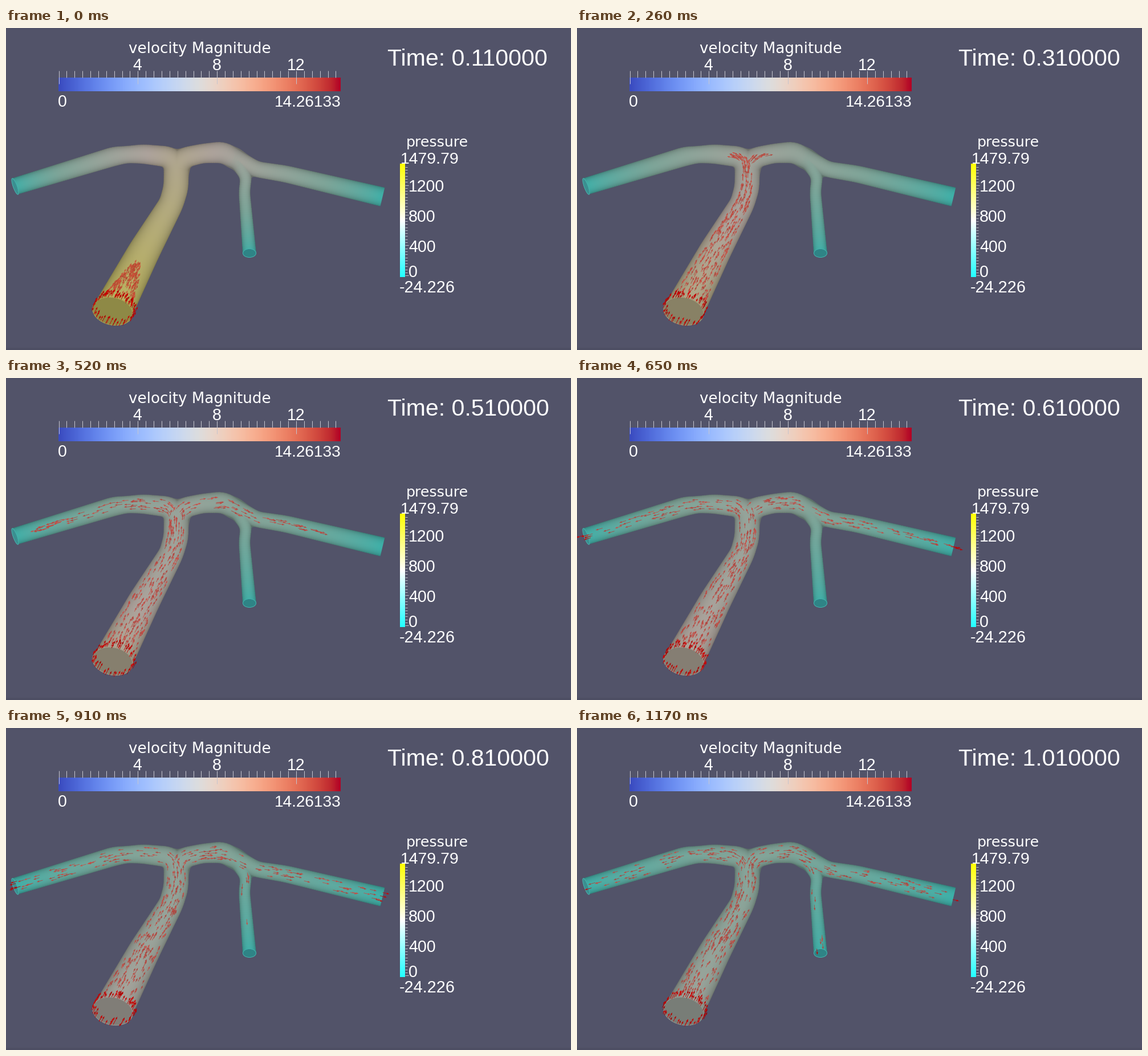
A matplotlib script that plays this animation: 991 by 565 pixels, repeating every 1.3 s.

```python
import numpy as np
import matplotlib.pyplot as plt
from matplotlib.animation import FuncAnimation
from matplotlib.collections import LineCollection, PolyCollection
from matplotlib.colors import LinearSegmentedColormap
from matplotlib.patches import Ellipse, Rectangle

W, H, DPI = 991, 565, 100
PX = 72 / DPI
FRAMES, STEP_MS = 10, 130
FRONT_SPEED = 117       # pixels per step on the tube axis
BG = "#525369"
RED = np.array([.84, 0, 0])

fig = plt.figure(figsize=(W / DPI, H / DPI), dpi=DPI, facecolor=BG)
ax = fig.add_axes([0, 0, 1, 1])


def label(x, y, text, size=28.5, font="Liberation Sans", ha="left"):
    return ax.text(x, y, text, fontsize=size * PX, family=font, color="white",
                   ha=ha, va="baseline", zorder=6)


def ticks(segments):
    ax.add_collection(LineCollection(segments, colors="#c4c4ce",
                                     linewidths=PX, zorder=5))


def pixel(v):
    return int(v) + .5


# ---- Legends ----
def velocity_legend():
    left, right, vmax = 92, 587, 14.26133
    ax.imshow(np.linspace(0, 1, 256)[None, :], cmap="coolwarm", aspect="auto",
              extent=(left, right, 111, 87), zorder=2)
    at = lambda v: pixel(left + (right - left) * v / vmax)
    ticks([[(at(.4 * i), 75), (at(.4 * i), 87 if i % 10 else 98)]
           for i in range(36)])
    for v in (4, 8, 12):
        label(at(v), 73.5, str(v), ha="center")
    label(340, 44.5, "velocity Magnitude", 26.1, "DejaVu Sans", "center")
    label(91, 138, "0")
    label(588, 138, "14.26133", 28, ha="right")


def pressure_legend():
    top, bottom, lo, hi = 238, 437, -24.226, 1479.79
    cmap = LinearSegmentedColormap.from_list(
        "pressure", ["#22ffff", "#ffffff", "#ffff00"])
    ax.imshow(np.linspace(1, 0, 199)[:, None], cmap=cmap, aspect="auto",
              extent=(691, 700, bottom, top), zorder=2)
    at = lambda v: bottom - (bottom - top) * (v - lo) / (hi - lo)
    ticks([[(700, pixel(at(v))), (706 if v % 400 == 0 else 704, pixel(at(v)))]
           for v in range(0, 1480, 40)])
    for v in range(0, 1201, 400):
        label(706, min(at(v) + 12, bottom), str(v))
    label(702, 208, "pressure", 25.3, "DejaVu Sans")
    label(692, 238, f"{hi}", 28.4)
    label(690, 464, f"{lo}", 28.8)


# ---- Vessel: key points x, y, radius ----
MAIN = [(187, 497, 34.5), (242, 392, 28), (290, 308, 21.5), (298, 280, 22),
        (299, 240, 21.5)]
LEFT = [(285, 226, 18.5), (240, 221, 17), (212, 222, 15), (190, 225, 17),
        (15, 278, 15)]
ARCH = [(314, 227, 18), (345, 220, 17), (380, 218, 19), (409, 233, 16)]
RIGHT = [(440, 248, 14), (490, 256, 15), (661, 296.5, 17)]
DOWN = [(421, 262, 10), (418, 288, 10), (427, 395, 12)]


def smooth_path(nodes, window=21):
    """Resample to one point per pixel and round the corners."""
    n = np.array(nodes, float)
    dist = np.r_[0, np.cumsum(np.hypot(*np.diff(n[:, :2], axis=0).T))]
    s = np.arange(0, dist[-1])
    pts = np.stack([np.interp(s, dist, c) for c in n.T], axis=1)
    padded = np.pad(pts, ((window // 2,) * 2, (0, 0)), mode="reflect",
                    reflect_type="odd")
    kernel = np.ones(window) / window
    return np.stack([np.convolve(c, kernel, "valid") for c in padded.T], axis=1)


PATHS = [smooth_path(MAIN + LEFT), smooth_path(MAIN + ARCH + RIGHT),
         smooth_path(MAIN + ARCH + DOWN)]
FORK = len(smooth_path(MAIN))


def pressure_share(path):
    """Linear drop up to the fork, then a power law down to the outlet."""
    i = np.arange(len(path))
    u = np.clip((i - FORK) / (len(path) - 1 - FORK), 0, 1)
    return np.where(i < FORK, 1 - .28 * i / FORK, .72 * (1 - u) ** .6)


def unit(v):
    return v / np.hypot(*v.T)[..., None]


BOX = (0, 670, 190, 540)


def surface_fields(blend=3):
    """Pressure share, shading and coverage of the pixels in BOX."""
    x0, x1, y0, y1 = BOX
    gx, gy = np.meshgrid(np.arange(x0, x1, dtype=np.float32) + .5,
                         np.arange(y0, y1, dtype=np.float32) + .5)
    near = np.full(gx.shape, 9, np.float32)
    total, share, union = (np.zeros_like(gx) for _ in range(3))

    def beyond(p, q):
        d = unit(p - q)
        return (gx - p[0]) * d[0] + (gy - p[1]) * d[1]

    for path, start in zip(PATHS, (0, FORK, FORK + 110)):
        edge = np.full(gx.shape, 999, np.float32)
        samples = np.c_[path, pressure_share(path)][start::4]
        for x, y, r, p in samples.astype(np.float32):
            d2 = (gx - x) ** 2 + (gy - y) ** 2
            q = d2 / r ** 2 + np.float32(.02)
            w = 1 / (q * q * q)
            total += w
            share += w * p
            np.minimum(near, q, out=near)
            np.minimum(edge, np.sqrt(d2) - r, out=edge)
        edge = np.maximum(edge, beyond(path[-1, :2], path[-9, :2]))
        if start == 0:
            edge = np.maximum(edge, beyond(path[0, :2], path[8, :2]))
        union += np.exp(-np.clip(edge, -60, 60) / blend)
    cover = np.clip(.5 + blend * np.log(union), 0, 1)
    shade = .7 + .32 * np.sqrt(1 - np.clip(near, 0, 1))
    return share / total, shade[..., None], cover[..., None]


SHARE, SHADE, COVER = surface_fields()
TONES = np.array([(56, 174, 167), (124, 162, 150), (170, 160, 153),
                  (188, 182, 62)]) / 255


def tone(p):
    return np.stack([np.interp(p, (0, 400, 770, 1400), c) for c in TONES.T],
                    axis=-1)


def inlet_pressure(k):
    """Steady decline after a short opening peak."""
    return 1020 - 42 * k + 190 * np.exp(-3 * k)


# ---- Inlet rim ----
RIM, RIM_AXES, TILT = np.array([187, 497]), np.array([36, 24.5]), 12
c, s = np.cos(np.radians(TILT)), np.sin(np.radians(TILT))
TURN = np.array([[c, s], [-s, c]])


def rim_level(pos):
    """1 on the rim, smaller inside."""
    return np.hypot(*((pos - RIM) @ TURN.T / RIM_AXES).T)


# ---- Particles carried by a parabolic velocity profile ----
def make_particles():
    rng = np.random.default_rng(7)
    born = np.repeat(np.arange(FRAMES), [260] + [32] * (FRAMES - 1)) - .8
    n = len(born)
    born = born + rng.uniform(0, .18, n) + (born > 0) * rng.uniform(0, .6, n)
    rho = np.sqrt(rng.uniform(0, .97, n))
    theta = rng.uniform(0, 2 * np.pi, n)
    speed = 1 - rho ** 2
    route = (rng.random(n) < .52).astype(int)
    route[(speed < .55) & (rng.random(n) < .2)] = 2
    return (born, rho * np.cos(theta), rho * np.sin(theta), speed, route,
            rng.uniform(.85, 1, n))


BORN, SIDE, DEPTH, SPEED, ROUTE, GLOW = make_particles()


def along(path, s, side):
    i = np.clip(s, 0, len(path) - 2).astype(int)
    t = unit(path[np.minimum(i + 4, len(path) - 1), :2]
             - path[np.maximum(i - 4, 0), :2])
    normal = np.stack([-t[:, 1], t[:, 0]], axis=1)
    pos = (path[i, :2] + (s - i)[:, None] * t
           + (.86 * side * path[i, 2])[:, None] * normal)
    return pos, t


def flow_arrows(k):
    """Base, tip and colour of the arrows inside the vessel."""
    haze = tone(inlet_pressure(k) * .9)
    inner = .68 * np.array([.86, .16, .13]) + .32 * haze
    for r, path in enumerate(PATHS):
        s = FRONT_SPEED * (k - BORN) * SPEED + 22 * DEPTH
        m = (ROUTE == r) & (k > BORN) & (s < len(path) + 4)
        pos, t = along(path, s[m], SIDE[m])
        level = rim_level(pos)
        bare = ((level < 1.3) | (s[m] > len(path) - 12))[:, None]
        length = 7 + 7 * SPEED[m] * min(1, .4 + k)
        color = np.where(bare, RED, inner) * GLOW[m, None]
        seen = level > .97
        yield pos[seen], (pos + length[:, None] * t)[seen], color[seen]


def rim_arrows(k, n=48):
    rng = np.random.default_rng(100 + k)
    a = np.linspace(0, 2 * np.pi, n, endpoint=False) + rng.normal(0, .06, n)
    ring = np.stack([np.cos(a), np.sin(a)], axis=1) * RIM_AXES
    base = RIM + ring @ TURN + rng.normal(0, 1, (n, 2))
    axis = unit(PATHS[0][8, :2] - PATHS[0][0, :2])
    length = rng.uniform(6, 16, (n, 1))
    return base, base + length * axis, RED * rng.uniform(.75, 1, (n, 1))


def arrow_shapes(k):
    groups = [*flow_arrows(k), rim_arrows(k)]
    base, tip, color = map(np.concatenate, zip(*groups))
    t = unit(tip - base)
    normal = np.stack([-t[:, 1], t[:, 0]], axis=1)
    neck = tip - 4.5 * t
    heads = np.stack([tip, neck + 1.5 * normal, neck - 1.5 * normal], axis=1)
    return np.stack([base, neck], axis=1), heads, color


# ---- Scene ----
def opening(x, y, w, h, angle, face, edge):
    return ax.add_patch(Ellipse((x, y), w, h, angle=angle, fc=face, ec=edge,
                                lw=PX, zorder=2))


ax.add_patch(Rectangle((0, 561), W, 4, color="#4d4e63", lw=0, zorder=0))
velocity_legend()
pressure_legend()
clock = label(669, 65.5, "", 41)

left, right, top, bottom = BOX
vessel = ax.imshow(np.zeros(SHARE.shape + (4,)), aspect="auto", zorder=1,
                   extent=(left, right, bottom, top), interpolation="nearest")
opening(16, 278, 7, 30, -20, "#3a8f90", "#46b3ae")
opening(427, 395, 23, 15, 0, "#2f8486", "#41b3ae")
inlet = opening(*RIM, *(2 * RIM_AXES - 1), TILT, BG, BG)

shafts = LineCollection([], linewidths=.8 * PX, zorder=3)
heads = PolyCollection([], linewidths=0, zorder=4)
ax.add_collection(shafts)
ax.add_collection(heads)

ax.set_xlim(0, W)
ax.set_ylim(H, 0)
ax.axis("off")


def draw(k):
    p = inlet_pressure(k)
    color = np.clip(tone(p * SHARE) * SHADE, 0, 1)
    vessel.set_data(np.concatenate([color, COVER], axis=2))
    inlet.set_facecolor(tone(p) * .78)
    inlet.set_edgecolor(tone(p) * .95)
    lines, tips, colors = arrow_shapes(k)
    shafts.set_segments(lines)
    shafts.set_color(colors)
    heads.set_verts(tips)
    heads.set_facecolor(colors)
    clock.set_text(f"Time: {.11 + .1 * k:.6f}")
    return vessel, inlet, shafts, heads, clock


anim = FuncAnimation(fig, draw, frames=FRAMES, interval=STEP_MS, repeat=True)
plt.show()
```
